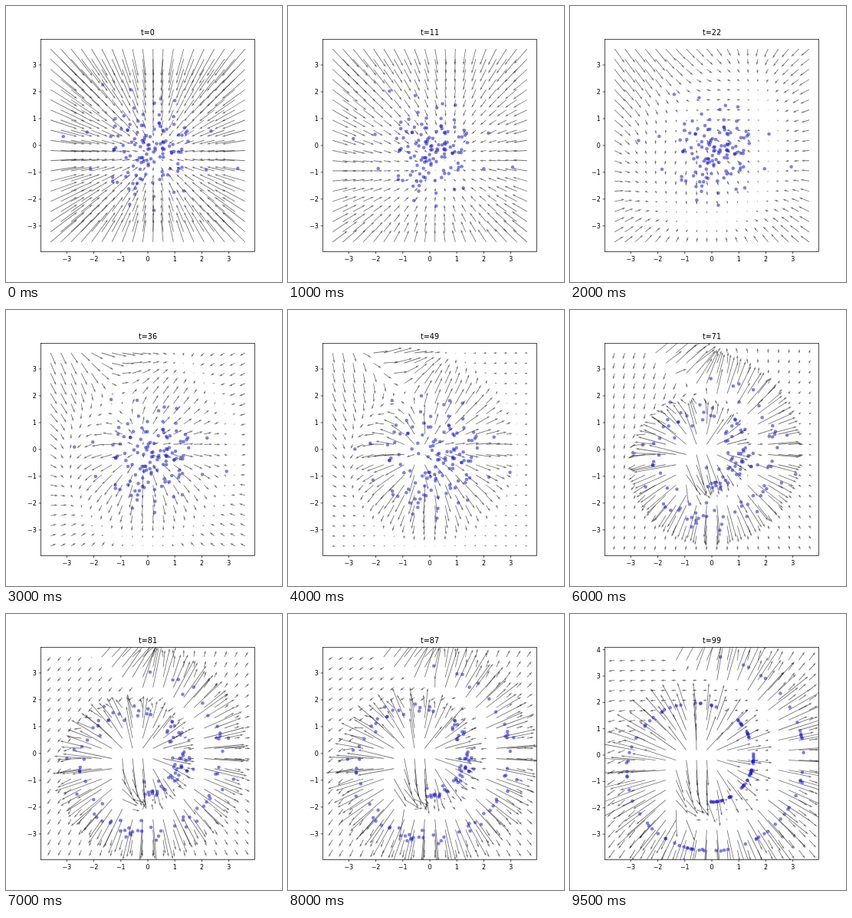
An HTML page with a canvas for the animation above (10 s loop, 360x360 px).

```html
<!DOCTYPE html>
<html lang="en">
<head>
<meta charset="utf-8">
<title>Flow field</title>
<style>
  html, body { margin: 0; width: 100%; height: 100%; overflow: hidden; background: #fff; }
  canvas { display: block; width: 360px; height: 360px; }
</style>
</head>
<body>
<canvas id="stage"></canvas>
<script>
const canvas = document.getElementById('stage');
const ctx = canvas.getContext('2d');
const ratio = window.devicePixelRatio || 1;
canvas.width = canvas.height = 360 * ratio;
ctx.scale(ratio, ratio);

const BOX = { l: 45.5, r: 324.5, t: 43.4, b: 320.4 };
const STEP_MS = 500;
const STEP_COUNT = 20;
const PACE = [[0, 0], [4, 22], [6, 36], [10, 61], [14, 81], [16, 87], [19, 99]];  // step, t
const LAST_T = 99;
const DOT_COUNT = 128;
const OUTLIERS = [
  [-3.13, 0.33], [3.33, -0.85], [-0.63, 2.08], [-1.67, 2.26], [2.34, 0.54], [2.16, -0.91],
  [1, 1.68], [0.23, -2.42], [-0.67, -2.2], [-2.12, -0.89], [1.33, -1.7], [-2.25, 0.5]
];
const GRID = 20;
const EXTENT = 3.6;
const ARROW = 9;        // pixels per unit of speed
const SHAFT = 0.84;
const FONT = '"DejaVu Sans", sans-serif';

// The flow carries Gaussian noise onto a spiral of one and a half turns
const SPIRAL = Array.from({ length: 160 }, (_, i) => {
  const a = Math.PI * (1.5 + 2.97 * (i + 0.5) / 160);
  return [0.3 * a * Math.cos(a) - 0.34, 0.3 * a * Math.sin(a) - 0.37];
});

let seed = 11;
function random() {
  seed = (seed * 16807) % 2147483647;
  return seed / 2147483647;
}
function gauss() {
  return Math.sqrt(-2 * Math.log(random())) * Math.cos(2 * Math.PI * random());
}

// Expected spiral point minus expected noise at (x, y), with the noise limited
function velocity(x, y, t) {
  const rest = Math.max(1 - t, 0.01);
  const spread = 2 * Math.max(rest, 0.2) ** 2;
  let sum = 0, mx = 0, my = 0;
  for (const [sx, sy] of SPIRAL) {
    const w = Math.exp(-((x - t * sx) ** 2 + (y - t * sy) ** 2) / spread);
    sum += w;
    mx += w * sx;
    my += w * sy;
  }
  mx /= sum;
  my /= sum;
  const nx = (x - t * mx) / rest, ny = (y - t * my) / rest;
  const limit = Math.min(1, (2 + 3.5 * rest) / Math.hypot(nx, ny));
  return [mx - nx * limit, my - ny * limit];
}

function startDots() {
  const dots = OUTLIERS.slice();
  while (dots.length < DOT_COUNT) {
    const x = 0.95 * gauss(), y = 0.9 * gauss() - 0.1;
    if (Math.hypot(x, y) < 2) dots.push([x, y]);
  }
  return dots;
}

const history = [startDots()];
for (let t = 0; t < LAST_T; t++) {
  history.push(history[t].map(([x, y]) => {
    const [vx, vy] = velocity(x, y, t / 100);
    return [x + vx / 100, y + vy / 100];
  }));
}

function timeAt(step) {
  const i = PACE.findIndex(p => p[0] >= step);
  if (i === 0) return 0;
  const [s0, t0] = PACE[i - 1], [s1, t1] = PACE[i];
  return Math.round(t0 + (t1 - t0) * (step - s0) / (s1 - s0));
}

function drawArrow(x, y, vx, vy) {
  const len = Math.hypot(vx, vy) * ARROW;
  ctx.beginPath();
  if (len < SHAFT) {
    ctx.arc(x, y, SHAFT / 2, 0, 2 * Math.PI);
    ctx.fill();
    return;
  }
  const w = SHAFT * Math.min(1, len / (5 * SHAFT));
  ctx.save();
  ctx.translate(x, y);
  ctx.rotate(Math.atan2(-vy, vx));
  ctx.moveTo(0, -w / 2);
  ctx.lineTo(len - 4.5 * w, -w / 2);
  ctx.lineTo(len - 5 * w, -1.5 * w);
  ctx.lineTo(len, 0);
  ctx.lineTo(len - 5 * w, 1.5 * w);
  ctx.lineTo(len - 4.5 * w, w / 2);
  ctx.lineTo(0, w / 2);
  ctx.fill();
  ctx.restore();
}

function label(text, x, y, size, align) {
  ctx.font = size + 'px ' + FONT;
  ctx.textAlign = align;
  ctx.fillText(text, x, y);
}

function drawAxes(t, px, py, hi) {
  ctx.strokeStyle = ctx.fillStyle = '#000';
  ctx.lineWidth = 0.7;
  ctx.strokeRect(BOX.l, BOX.t, BOX.r - BOX.l, BOX.b - BOX.t);
  ctx.beginPath();
  for (let n = -3; n <= hi; n++) {
    const text = String(n).replace('-', '\u2212');
    if (n < 4) {
      ctx.moveTo(px(n), BOX.b);
      ctx.lineTo(px(n), BOX.b + 2.8);
      label(text, px(n), 332.9, 8, 'center');
    }
    ctx.moveTo(BOX.l, py(n));
    ctx.lineTo(BOX.l - 2.8, py(n));
    label(text, BOX.l - 5.6, py(n) + 3, 8, 'right');
  }
  ctx.stroke();
  label('t=' + t, (BOX.l + BOX.r) / 2, 38.4, 9.6, 'center');
}

function draw(t) {
  const dots = history[t];

  // The vertical range grows with the highest dot
  const top = Math.max(EXTENT, ...dots.map(p => p[1]));
  const margin = 0.05 * (top + EXTENT);
  const lo = -EXTENT - margin, hi = top + margin, side = EXTENT * 1.1;
  const px = x => BOX.l + (x + side) / (2 * side) * (BOX.r - BOX.l);
  const py = y => BOX.b - (y - lo) / (hi - lo) * (BOX.b - BOX.t);

  ctx.fillStyle = '#fff';
  ctx.fillRect(0, 0, 360, 360);

  ctx.save();
  ctx.beginPath();
  ctx.rect(BOX.l, BOX.t, BOX.r - BOX.l, BOX.b - BOX.t);
  ctx.clip();
  ctx.fillStyle = 'rgba(0,0,0,0.55)';
  for (let i = 0; i < GRID; i++) {
    for (let j = 0; j < GRID; j++) {
      const x = EXTENT * (2 * i / (GRID - 1) - 1);
      const y = EXTENT * (2 * j / (GRID - 1) - 1);
      drawArrow(px(x), py(y), ...velocity(x, y, t / 100));
    }
  }
  ctx.fillStyle = 'rgba(20,20,215,0.55)';
  for (const [x, y] of dots) {
    ctx.beginPath();
    ctx.arc(px(x), py(y), 2.25, 0, 2 * Math.PI);
    ctx.fill();
  }
  ctx.restore();

  drawAxes(t, px, py, hi);
}

let shown = -1;
const begin = performance.now();
function tick() {
  const step = Math.floor((performance.now() - begin) / STEP_MS) % STEP_COUNT;
  if (step !== shown) {
    shown = step;
    draw(timeAt(step));
  }
  requestAnimationFrame(tick);
}
tick();
</script>
</body>
</html>
```
